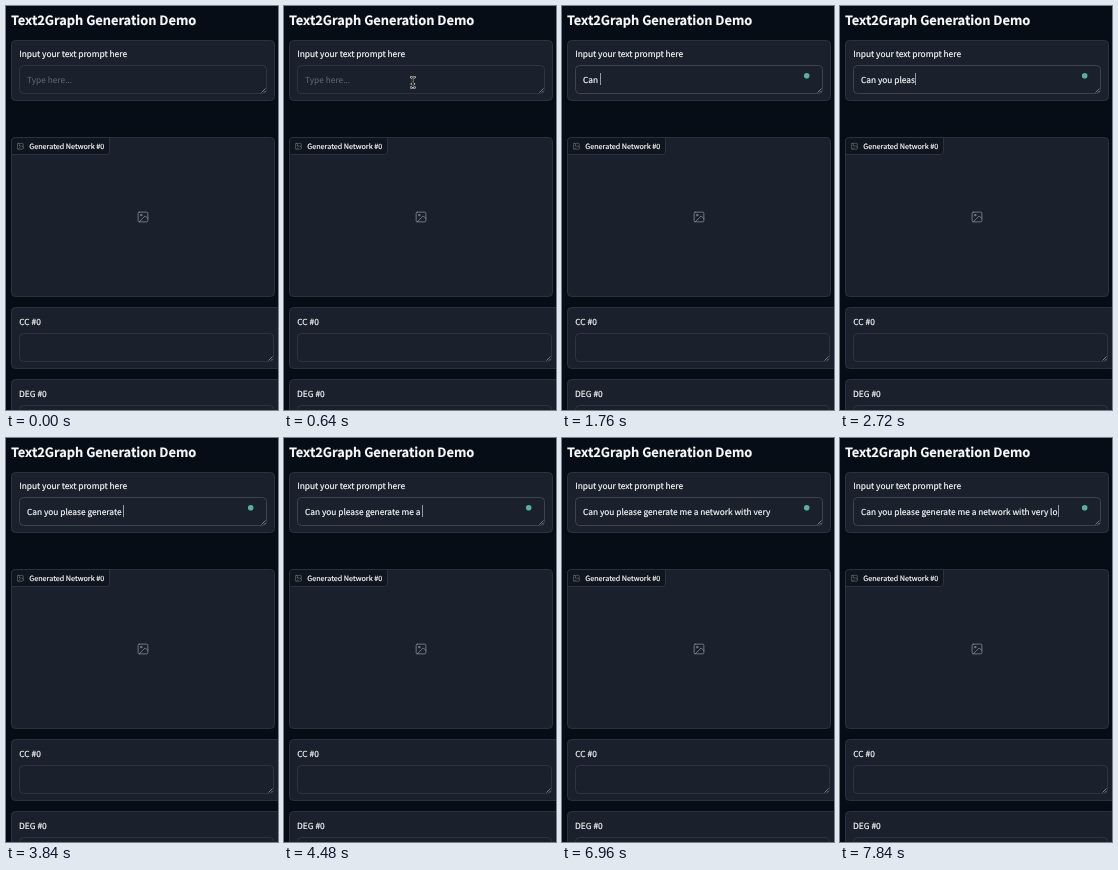
Animation of 272x404 px, one loop 8000 ms. Source, as an HTML page:

```html
<!DOCTYPE html>
<html lang="en">
<head>
<meta charset="utf-8">
<title>Text2Graph Generation Demo</title>
<style>
  html, body { margin: 0; width: 100%; height: 100%; overflow: hidden; background: #070d16; }
  svg { display: block; width: 272px; height: 404px; }
  text {
    font: 8.4px "Noto Sans CJK SC", "Noto Sans CJK JP", "Noto Sans CJK", "Open Sans", sans-serif;
    fill: #fafbfc; stroke: #fafbfc; stroke-width: .18; white-space: pre; text-rendering: geometricPrecision;
  }
  .title { font-size: 12.82px; font-weight: 700; }
  .tag { font-size: 7.22px; }
  .typed { font-size: 8.36px; }
  .hint { fill: #636a76; stroke: none; }
  .panel, .field { fill: #1b212c; stroke: #2b323d; }
  .field { stroke: #2d3541; }
  .field.focus { stroke: #3b434f; }
  .grip { fill: none; stroke: #9da2aa; stroke-width: .7; }
  .icon { fill: none; stroke: #858b95; stroke-width: 1.5; stroke-linecap: round; stroke-linejoin: round; }
</style>
</head>
<body>
<svg viewBox="0 0 272 404">
  <defs>
    <g id="picture" class="icon">
      <rect x="-9" y="-9" width="18" height="18" rx="2"/>
      <circle cx="-3.5" cy="-3.5" r="1.5"/>
      <path d="M9 3 4-2-7 9"/>
    </g>
    <path id="grip" class="grip" d="M-5.5-1.5l4-4M-3-1.5l1.5-1.5"/>
    <path id="beam" d="M-2-5.2q2 0 2 1.6V3.6q0 1.6-2 1.6M2-5.2q-2 0-2 1.6V3.6q0 1.6 2 1.6M-1.3 1.7h2.6"/>
  </defs>
  <rect width="272" height="404" fill="#070d16"/>
  <text class="title" x="4.9" y="18.8">Text2Graph Generation Demo</text>

  <rect class="panel" x="5.5" y="34.5" width="263" height="60" rx="4"/>
  <text x="13.2" y="51">Input your text prompt here</text>
  <rect id="field" class="field" x="13.5" y="59.5" width="247" height="28" rx="4"/>
  <use href="#grip" x="261" y="88"/>
  <text id="hint" class="typed hint" x="21" y="76.6">Type here...</text>
  <text id="typed" class="typed" x="21" y="76.6"></text>
  <rect id="caret" y="67" width="1" height="12" fill="#fff" opacity=".55"/>
  <circle id="badge"/>

  <rect class="panel" x="5.5" y="131.5" width="263" height="159" rx="4"/>
  <path d="M5.5 148.5V135.5a4 4 0 0 1 4-4H103.5V145.5a3 3 0 0 1-3 3Z" fill="#10161f" stroke="#2b323d"/>
  <use href="#picture" transform="translate(14.4 140.3) scale(.32)"/>
  <text class="tag" x="23.2" y="143">Generated Network #0</text>
  <use href="#picture" transform="translate(137 211) scale(.54)"/>

  <rect class="panel" x="5.5" y="301.5" width="270" height="61" rx="4"/>
  <text x="13.3" y="318.5">CC #0</text>
  <rect class="field" x="13.5" y="327.5" width="254" height="28" rx="4"/>
  <use href="#grip" x="268" y="356"/>

  <rect class="panel" x="5.5" y="373.5" width="270" height="61" rx="4"/>
  <text x="13.1" y="390.5">DEG #0</text>
  <rect class="field" x="13.5" y="399.5" width="254" height="28" rx="4"/>

  <g id="pointer" fill="none" stroke-linecap="round">
    <use href="#beam" stroke="#fff" stroke-width="2"/>
    <use href="#beam" stroke="#000" stroke-width=".9"/>
  </g>
</svg>
<script>
const LOOP = 8000, STEP = 80;
const ENTER = 160, ARRIVE = 720, FOCUS = 800, TYPE = 1360;
const MESSAGE = "Can you please generate me a network with very lo";
// [time, characters typed]
const TYPING = [
  [1280, 0], [1360, 1], [2320, 9], [2480, 10], [2720, 13], [2880, 14],
  [3440, 20], [3600, 21], [3840, 24], [4000, 25], [4640, 31], [4800, 32],
  [5200, 38], [5360, 39], [5600, 42], [5920, 43], [6480, 47], [7680, 48], [7840, 49]
];

const [field, hint, typed, caret, badge, pointer] =
  ["field", "hint", "typed", "caret", "badge", "pointer"].map(id => document.getElementById(id));

const show = (node, on) => node.setAttribute("visibility", on ? "visible" : "hidden");
const mix = (a, b, p) => a + (b - a) * p;
const progress = (t, from, to) => Math.min(1, Math.max(0, (t - from) / (to - from)));
const easeOut = p => 1 - (1 - p) ** 3;

function typedCount(t) {
  const next = TYPING.findIndex(([time]) => time > t);
  if (next === 0) return 0;
  if (next < 0) return MESSAGE.length;
  const [t0, n0] = TYPING[next - 1], [t1, n1] = TYPING[next];
  return Math.floor(mix(n0, n1, progress(t, t0, t1)) + 1e-6);
}

function drawBadge(t) {
  const settle = progress(t, TYPE - STEP, TYPE + 2 * STEP) * (t >= TYPE);
  const grow = easeOut(progress(t, FOCUS, FOCUS + 240));
  badge.setAttribute("cx", mix(241.8, 244.7, settle));
  badge.setAttribute("cy", mix(69.5, 69.8, settle));
  badge.setAttribute("r", mix(8.6, 2.8, settle) * grow);
  badge.setAttribute("fill", settle < 1 ? "#fff" : "#5cae9d");
  show(badge, t >= FOCUS);
}

function draw(time) {
  const t = Math.floor((time % LOOP) / STEP) * STEP;
  const count = typedCount(t);
  typed.textContent = MESSAGE.slice(0, count);
  show(hint, count === 0);
  field.classList.toggle("focus", t >= FOCUS);

  const width = count ? typed.getComputedTextLength() : 0;
  caret.setAttribute("x", Math.round(21 + width));
  show(caret, t >= FOCUS && !(t >= 6960 && t < 7520));

  const p = easeOut(progress(t, ENTER, ARRIVE));
  pointer.setAttribute("transform", `translate(${mix(160, 128.8, p)} ${mix(20, 76.5, p)})`);
  show(pointer, t >= ENTER && t < TYPE);
  drawBadge(t);
}

const start = performance.now();
function tick() {
  draw(performance.now() - start);
  requestAnimationFrame(tick);
}
tick();
</script>
</body>
</html>
```
